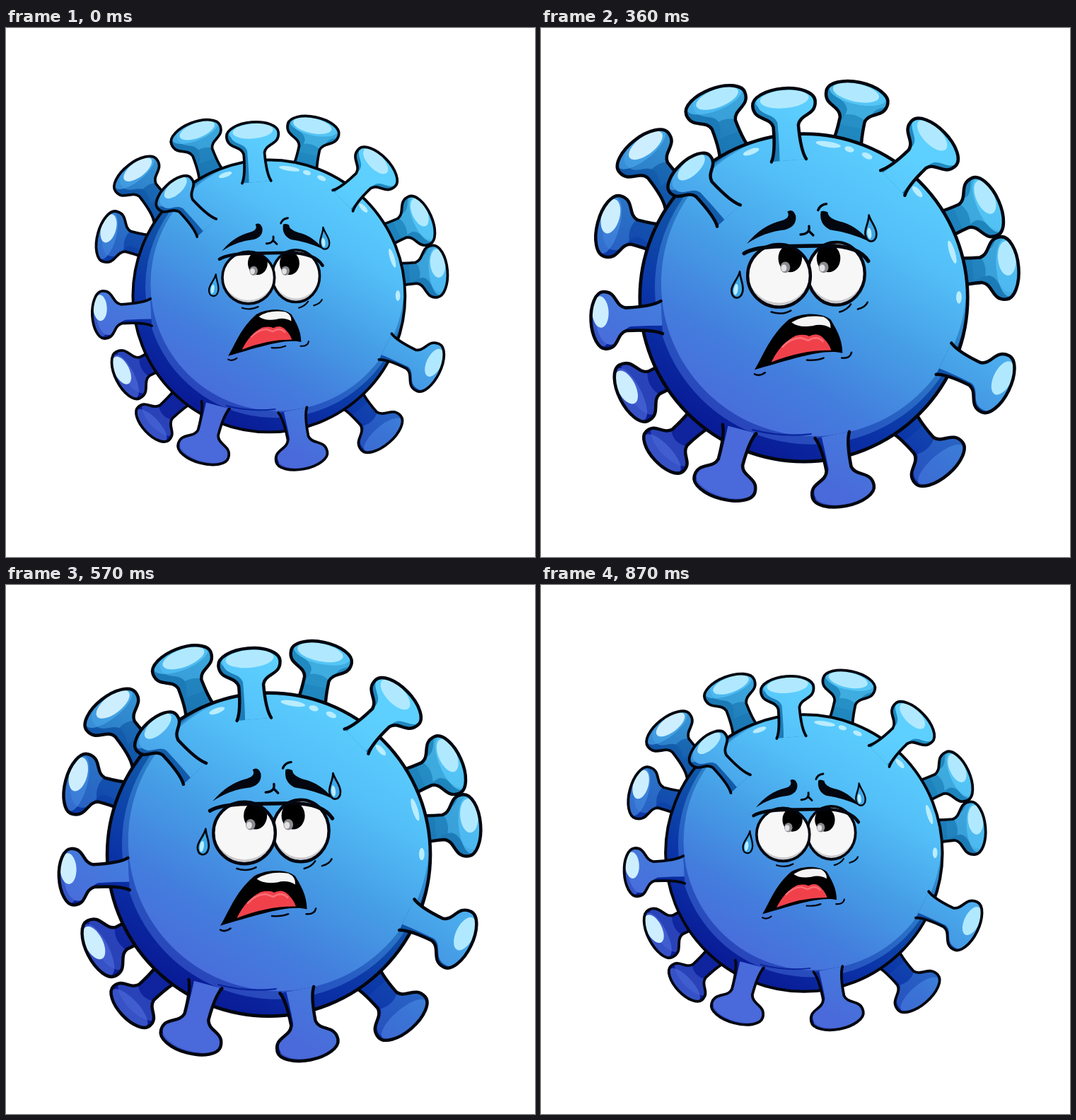
These frames come from a looping animation (748 by 748 pixels, 0.9 s). An HTML page with a canvas:

```html
<!DOCTYPE html>
<html lang="en">
<head>
<meta charset="utf-8">
<title>Worried virus</title>
<style>
  html, body { margin: 0; width: 100%; height: 100%; overflow: hidden; background: #fff; }
  canvas { display: block; }
</style>
</head>
<body>
<canvas width="748" height="748"></canvas>
<script>
const ctx = document.querySelector('canvas').getContext('2d');
const INK = '#03060f', GLINT = '#b9edff';
const LOOP = 900, STEP = 30, GROWTH = 0.255;
const DRAWN_SCALE = 1.221;            // artwork below is laid out at this scale
const PIVOT = { x: 373.5, y: 367 };
const RAD = Math.PI / 180;

function ramp(...colors) {
  const g = ctx.createLinearGradient(490, 160, 250, 570);
  colors.forEach((c, i) => g.addColorStop(i / (colors.length - 1), c));
  return g;
}
const light = ramp('#5dd0ff', '#53bff8', '#469fe6', '#437edd', '#4a69da');
const dark = ramp('#2089c0', '#1b78b5', '#1053a8', '#0b35a8', '#091c97');

// head position, direction of the stalk in degrees, optional size
const backSpikes = [
  [245, 103, 69], [448, 94, 102], [142, 173, 52], [97, 279, 15], [631, 251, 156],
  [658, 339, 175], [128, 518, -27], [172, 602, -43, 39], [565, 618, -131]
];
const frontSpikes = [
  [343, 103, 85], [558, 160, 136], [208, 204, 47, 39], [86, 414, -3, 41],
  [258, 649, -75], [428, 659, -101], [646, 505, -154]
];

function fill(path, color, alpha = 1) {
  ctx.globalAlpha = alpha;
  ctx.fillStyle = color;
  ctx.fill(path);
  ctx.globalAlpha = 1;
}
function line(path, width = 2.6, color = INK) {
  ctx.lineWidth = width;
  ctx.strokeStyle = color;
  ctx.stroke(path);
}
function inside(path, paint) {
  ctx.save();
  ctx.clip(path);
  paint();
  ctx.restore();
}
function oval(x, y, rx, ry = rx, degrees = 0) {
  const path = new Path2D();
  path.ellipse(x, y, rx, ry, degrees * RAD, 0, 7);
  return path;
}
function moved(path, matrix) {
  const out = new Path2D();
  out.addPath(path, matrix);
  return out;
}
const offset = (x, y) => new DOMMatrix().translate(x, y);

function mushroom(size, length) {
  const w = size * .4, b = size * .48;
  return new Path2D(`M${-w - 7} ${length + 5} Q${-w} ${length - 8} ${-w} ${b + 11}
    C${-w - 4} ${b * .75} ${-size} ${b} ${-size} 0 A${size} ${b} 0 0 1 ${size} 0
    C${size} ${b} ${w + 4} ${b * .75} ${w} ${b + 11} Q${w} ${length - 8} ${w + 7} ${length + 5}`);
}

function spike([x, y, direction, size = 45], inFront) {
  const b = size * .48, lean = Math.cos(direction * RAD);
  const at = offset(x, y).rotate(direction - 90);
  const body = moved(mushroom(size, 77), at);
  const shift = direction < -60 ? 3 : inFront ? 6 : 10;
  fill(body, dark);
  inside(body, () => {
    const lit = moved(mushroom(size, inFront ? 110 : 50), offset(shift, -shift).multiply(at));
    fill(lit, light, inFront ? 1 : .5);
    if (!inFront) fill(moved(oval(0, b * 1.2 + 60, size, 60), at), dark, .8);
    fill(moved(oval(0, -b * .22, size * .92, b * .7), at), light, .7);
    // the glint slides towards the top of sideways heads; low heads have none
    if (y < 560) {
      const glint = oval(lean * size * .3, -b * .28, size * (.8 - .25 * Math.abs(lean)), b * .6);
      fill(moved(glint, at), x < 180 ? '#cdeeff' : '#b0e9ff');
    }
  });
  line(body, 4.6);
}

function drawBody() {
  const ball = oval(371.5, 381.5, 235);
  fill(ball, dark);
  inside(ball, () => {
    fill(oval(383, 367, 225), light, .5);
    fill(oval(386, 361, 219), light);
  });
  line(new Path2D('M164 440 Q183 508 243 551 M298 571 Q340 582 382 577'), 2.2, dark);
  line(ball, 4.8);
  // angle and half length of each shine along the upper right rim
  [[-110, 12], [-81, 18], [-73, 7], [-66, 8], [-43, 10], [-17, 17], [0, 9]].forEach(([angle, r]) =>
    fill(oval(372 + 222 * Math.cos(angle * RAD), 381 + 222 * Math.sin(angle * RAD), r, 4, angle + 90), GLINT));
}

function eye(x, y, r, pupilX) {
  const ball = oval(x, y, r, 45);
  fill(ball, '#c9c9cc');
  inside(ball, () => {
    fill(oval(x, y - 6, r, 45), '#f7f7f8');
    fill(oval(pupilX, 325, 17, 20), '#000');
    fill(oval(pupilX - 7, 338, 7, 8), '#8b8b90');
    fill(oval(pupilX - 9, 339, 4, 5), '#e2e2e4');
  });
  line(ball, 4.5);
}

function drop(x, y, tilt) {
  const at = offset(x, y).rotate(tilt);
  const tear = moved(new Path2D('M0 -20 C2 -9 9 -2 8 8 C7 21 -7 21 -8 8 C-9 -1 -1 -9 0 -20Z'), at);
  fill(tear, '#3da9e8');
  fill(moved(oval(-2, 6, 3, 8), at), GLINT);
  line(tear, 2.8);
}

function drawFace() {
  eye(418, 347, 41, 407);
  eye(336, 350, 45, 352);
  line(new Path2D('M286 318 Q300 309 340 308 L405 307 Q450 307 464 329'), 5.5);

  fill(new Path2D(`M290 304 Q311 278 340 271 Q353 267 348 258 Q356 253 360 264 Q362 279 345 284 Q315 287 290 304Z
    M396 258 Q393 276 409 284 Q438 288 466 301 Q446 277 422 272 Q406 267 406 259 Q400 256 396 258Z`), INK);
  line(new Path2D('M367 291 Q381 290 379 279 M380 287 l5 5 M392 256 Q395 248 404 247'), 3.5);
  line(new Path2D(`M325 402 Q340 407 353 400 M423 402 Q434 399 439 391 M449 398 Q460 395 463 388
    M301 491 Q308 495 316 489 M376 471 Q390 472 400 468 M426 468 Q438 469 440 460`));
  drop(277, 364, 8);
  drop(467, 283, -6);

  fill(new Path2D('M301 485 C313 466 322 437 350 413 C370 402 398 403 410 413 C417 425 427 440 427 461 C400 454 350 471 301 485Z'), '#000');
  fill(new Path2D('M354 417 Q372 405 400 409 Q411 414 410 425 Q398 418 384 422 Q364 425 354 417Z'), '#f5f5f6');
  fill(new Path2D('M325 474 Q338 447 360 436 Q374 433 379 437 Q392 430 401 441 Q408 448 411 457 Q370 456 325 474Z'), '#f0414b');
  line(new Path2D('M341 452 Q352 440 367 439 L378 443 Q390 435 399 444'), 2.5, '#fb7179');
}

function draw() {
  const t = Math.floor(performance.now() % LOOP / STEP) * STEP;
  const half = LOOP / 2;
  const k = (1 + GROWTH * (1 - Math.abs(t - half) / half)) / DRAWN_SCALE;
  ctx.setTransform(1, 0, 0, 1, 0, 0);
  ctx.fillStyle = '#fff';
  ctx.fillRect(0, 0, 748, 748);
  ctx.setTransform(k, 0, 0, k, PIVOT.x * (1 - k), PIVOT.y * (1 - k));
  ctx.lineCap = ctx.lineJoin = 'round';
  backSpikes.forEach(s => spike(s, false));
  drawBody();
  frontSpikes.forEach(s => spike(s, true));
  drawFace();
  requestAnimationFrame(draw);
}
draw();
</script>
</body>
</html>
```
